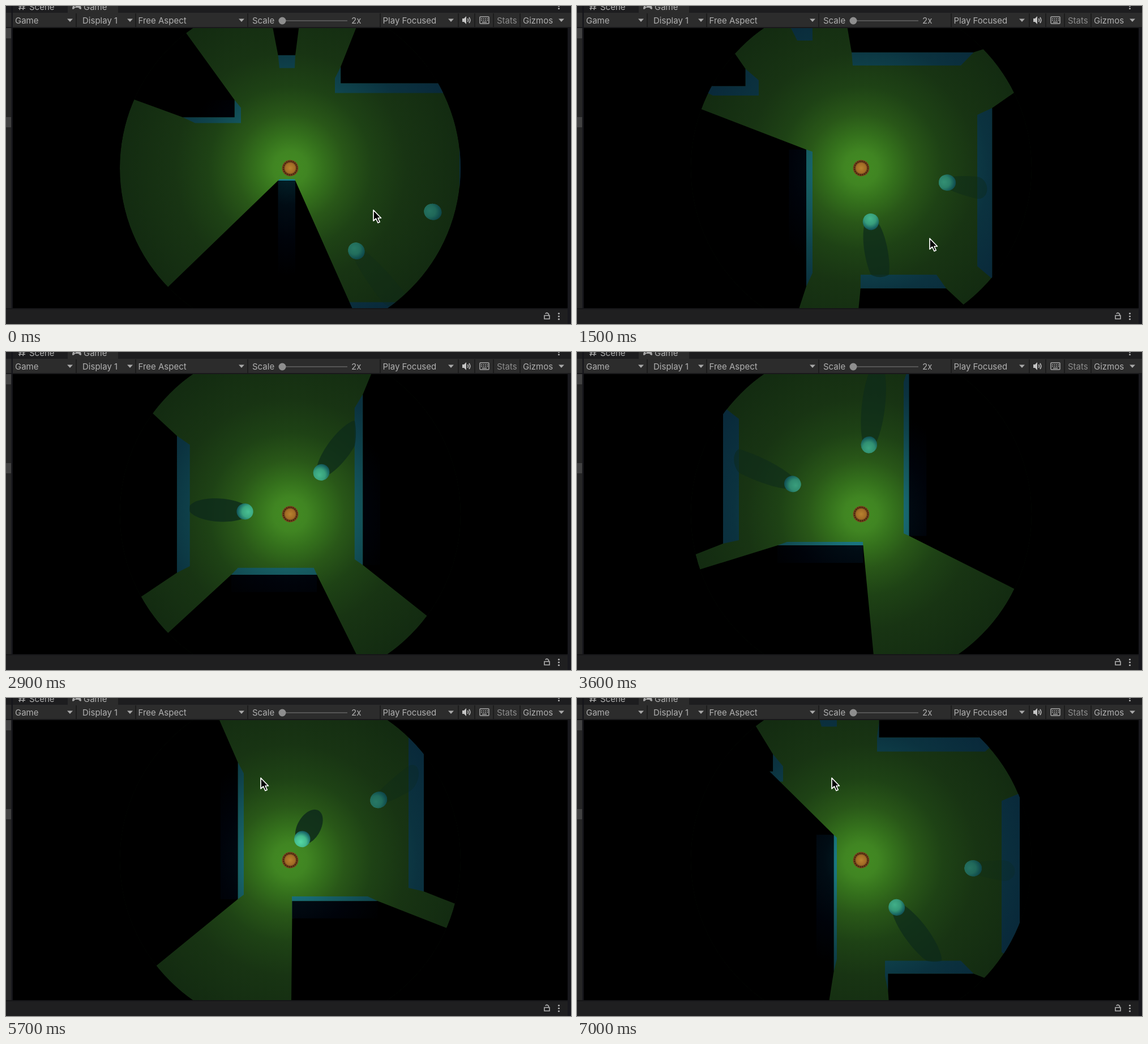
An HTML page that plays this animation: 998 by 561 pixels, repeating every 7100 ms.

```html
<!DOCTYPE html>
<html lang="en">
<head>
<meta charset="utf-8">
<title>Field of view</title>
<style>
html, body { margin: 0; width: 100%; height: 100%; overflow: hidden; background: #000; }
svg { display: block; width: 100vw; height: 100vh; }
text { font: 15px Inter, Roboto, sans-serif; fill: #b0b0b0; }
</style>
</head>
<body>
<svg viewBox="0 0 998 561">
  <defs>
    <clipPath id="view"><rect x="12" y="39" width="980" height="494"/></clipPath>
    <clipPath id="sight"><circle r="301"/></clipPath>
    <radialGradient id="floor" gradientUnits="userSpaceOnUse" cx="0" cy="0" r="301">
      <stop offset="0" stop-color="#438c23"/>
      <stop offset=".1" stop-color="#408522"/>
      <stop offset=".2" stop-color="#34701c"/>
      <stop offset=".32" stop-color="#295718"/>
      <stop offset=".48" stop-color="#1e4215"/>
      <stop offset=".68" stop-color="#183413"/>
      <stop offset="1" stop-color="#132b11"/>
    </radialGradient>
    <radialGradient id="face" gradientUnits="userSpaceOnUse" cx="0" cy="0" r="301">
      <stop offset=".08" stop-color="#1b8290"/>
      <stop offset=".33" stop-color="#165c62"/>
      <stop offset=".55" stop-color="#0f434c"/>
      <stop offset=".75" stop-color="#0b323f"/>
      <stop offset="1" stop-color="#09293a"/>
    </radialGradient>
    <radialGradient id="top" gradientUnits="userSpaceOnUse" cx="0" cy="0" r="190">
      <stop offset=".1" stop-color="#032028"/>
      <stop offset=".35" stop-color="#010c14"/>
      <stop offset=".65" stop-color="#00030a"/>
      <stop offset="1" stop-color="#000"/>
    </radialGradient>
    <radialGradient id="ball" cx=".3" cy=".5" r=".72">
      <stop offset="0" stop-color="#55d8a2"/>
      <stop offset=".5" stop-color="#44ba8d"/>
      <stop offset=".8" stop-color="#217a70"/>
      <stop offset="1" stop-color="#114f59"/>
    </radialGradient>
    <radialGradient id="hero">
      <stop offset="0" stop-color="#b8822f"/>
      <stop offset=".6" stop-color="#a16a25"/>
      <stop offset=".75" stop-color="#6c4018"/>
      <stop offset="1" stop-color="#754a1e"/>
    </radialGradient>
  </defs>

  <g clip-path="url(#view)">
    <g transform="translate(502 286)">
      <g clip-path="url(#sight)">
        <circle r="301" fill="url(#floor)"/>
        <path id="faces" fill="url(#face)"/>
        <g id="shadows" fill="#0d2a1b"/>
        <g id="balls"/>
        <path id="hidden" fill="#000"/>
        <path id="tops" fill="url(#top)"/>
      </g>
      <circle r="14.5" fill="url(#hero)"/>
      <circle r="12" fill="none" stroke="#4a2410" stroke-width="2.4" stroke-dasharray="2.4 1.37"/>
    </g>
  </g>

  <rect width="998" height="12" fill="#1d1d1f"/>
  <rect x="109" width="89" height="13" fill="#2c2c2c"/>
  <rect y="12" width="998" height="26" fill="#2c2c2c"/>
  <rect y="37" width="998" height="2" fill="#19191b"/>
  <rect y="533" width="998" height="28" fill="#1f1f20"/>
  <rect y="533" width="998" height="2" fill="#161618"/>
  <rect y="39" width="10" height="494" fill="#262626"/>
  <path d="M0 39H9V57H0ZM0 196H9V214H0Z" fill="#424242"/>
  <rect x="9.5" width="2.5" height="533" fill="#15151a"/>
  <rect x="992" y="39" width="6" height="522" fill="#18181d"/>
  <path id="bars" stroke="#1b1b1b" stroke-width="1.6"/>
  <g id="labels"></g>
  <path id="carets" fill="#a8a8a8"/>
  <path d="M488 26H603" stroke="#555" stroke-width="2"/>
  <circle cx="488" cy="26" r="6.5" fill="#8e8e8e"/>

  <!-- toolbar and tab icons -->
  <path d="M806 22H809L813 18V32L809 28H806Z" fill="#c4c4c4"/>
  <path d="M815.500 22Q817.500 25 815.500 28M818 20Q821.500 25 818 30" fill="none" stroke="#c4c4c4" stroke-width="1.500"/>
  <rect x="837" y="19" width="16" height="12" rx="1" fill="none" stroke="#a8a8a8" stroke-width="1.500"/>
  <path d="M839 22.500H852M839 25.500H852" stroke="#a8a8a8" stroke-width="1.600" stroke-dasharray="2 1.500"/>
  <path d="M841 28.500H849" stroke="#a8a8a8" stroke-width="1.500"/>
  <path d="M26 -3L24 7M32 -3L30 7M22 0H34M22 4H34" stroke="#a8a8a8" stroke-width="1.600"/>
  <path d="M120 -3H130Q133 1 133 5Q131 7 128 3H122Q119 7 117 5Q117 1 120 -3Z" fill="#a8a8a8"/>
  <path d="M122 -2V2M120 0H124" stroke="#2c2c2c"/>
  <path d="M951 546H960V552H951ZM958.500 546V543.500Q955.500 539.500 952.800 543" fill="none" stroke="#b0b0b0" stroke-width="1.600"/>
  <g fill="#b0b0b0">
    <circle cx="976.500" cy="542.500" r="1.600"/><circle cx="976.500" cy="547.500" r="1.600"/>
    <circle cx="976.500" cy="552.500" r="1.600"/><circle cx="976.500" cy="0" r="1.500"/>
    <circle cx="976.500" cy="4.500" r="1.500"/>
  </g>
  <path id="pointer" d="M0 0V19L4.500 15 8 22.500 11.200 21 8 14H13.500Z" fill="#000" stroke="#fff" stroke-width="1.700" stroke-linejoin="round"/>
</svg>
<script>
const $ = id => document.getElementById(id);
const LOOP = 7100, STEP = 100;
const SIGHT = 301;
const LIFT = 1.13;         // perspective scale at wall-top height
const MID = 1.063;         // the same at ball-centre height
const EYE = 233;           // camera height above the floor
const LAMP = 47, RAD = 13.4;
const SPREAD = 1.6 * Math.PI / 180;

// walls on the floor: left, top, right, bottom
const walls = [
  [-159, -76, -132, 138],
  [159, -141, 186, 126],
  [-47, 141, 87, 168],
  [-61, -254, 130, -228],
  [-308, -202, -227, -175],
  [-159, -420, -132, -272]
];
const room = [-132, -228, 159, 141];
const balls = [[97, -23], [-30, 42]];

// time, x, y
const walk = [
  [0, -140, -95.5], [250, -140, -95.5], [800, -93, -95], [1500, -46, -47],
  [2200, 0, 0], [3500, 84, 86], [3600, 84, 92], [3980, 60, 116],
  [4600, 18, 116], [4960, -11, 116], [5650, -50, 77], [5750, -50, 77],
  [6300, -89, 34], [7000, -89, -36.5]
];
const mouse = [
  [0, 649, 360], [200, 649, 360], [900, 623, 410], [2900, 623, 410],
  [4100, 450, 141], [7100, 450, 141]
];

function along(keys, t) {
  let i = 0;
  while (i < keys.length - 2 && keys[i + 1][0] < t) i++;
  const [a, ax, ay] = keys[i], [b, bx, by] = keys[i + 1];
  const k = Math.min(1, (t - a) / (b - a));
  return [ax + (bx - ax) * k, ay + (by - ay) * k];
}

const set = (el, attrs) => {
  for (const k in attrs) el.setAttribute(k, attrs[k]);
  return el;
};
const add = (parent, tag, attrs = {}) =>
  parent.appendChild(set(document.createElementNS("http://www.w3.org/2000/svg", tag), attrs));
const clamp = (v, lo, hi) => Math.min(hi, Math.max(lo, v));
const poly = pts => "M" + pts.map(p => p[0].toFixed(2) + " " + p[1].toFixed(2)).join("L") + "Z";
const polar = (r, a) => [r * Math.cos(a), r * Math.sin(a)];
const raise = p => [p[0] * LIFT, p[1] * LIFT];
const shift = ([l, t, r, b], x, y) => [l - x, t - y, r - x, b - y];

function facesOf([l, t, r, b]) {
  const quad = (p, q) => poly([p, q, raise(q), raise(p)]);
  let d = "";
  if (l > 0) d += quad([l, t], [l, b]);
  if (r < 0) d += quad([r, t], [r, b]);
  if (t > 0) d += quad([l, t], [r, t]);
  if (b < 0) d += quad([l, b], [r, b]);
  return d;
}

const corners = ([l, t, r, b]) => [[l, t], [r, t], [r, b], [l, b]].map(raise);

// area a wall hides, opening slightly past its outermost corners
function blindOf(wall) {
  const pts = corners(wall);
  const mid = Math.atan2(wall[1] + wall[3], wall[0] + wall[2]);
  const turn = p => {
    const a = Math.atan2(p[1], p[0]) - mid;
    return Math.atan2(Math.sin(a), Math.cos(a));
  };
  pts.sort((p, q) => turn(p) - turn(q));
  const lo = pts[0], hi = pts[3];
  const a = mid + turn(lo) - SPREAD, b = mid + turn(hi) + SPREAD;
  const reach = p => Math.max(SIGHT, Math.hypot(...p) + 5);
  return poly([lo, polar(reach(lo), a), polar(900, a), polar(1400, mid),
    polar(900, b), polar(reach(hi), b), hi]);
}

// a shadow point that passes a room side climbs that wall
function land([x, y], [l, t, r, b]) {
  let s = 1;
  if (l < 0 && x < l) s = Math.min(s, l / x);
  if (r > 0 && x > r) s = Math.min(s, r / x);
  if (t < 0 && y < t) s = Math.min(s, t / y);
  if (b > 0 && y > b) s = Math.min(s, b / y);
  const k = s / (1 - LAMP * (1 - s) / EYE);
  return [x * k, y * k];
}

// outline of the lamp's cone around a ball at distance d
function shadowOf(d, angle, box) {
  const drop = Math.atan2(LAMP - RAD, d);
  const half = Math.asin(RAD / Math.hypot(d, LAMP - RAD));
  const near = LAMP / Math.tan(drop + half), far = LAMP / Math.tan(drop - half);
  const c = (near + far) / 2;
  const dot = (c * Math.cos(drop) + LAMP * Math.sin(drop)) / Math.cos(half);
  const w = Math.sqrt(Math.max(0, dot * dot - c * c - LAMP * LAMP));
  const [ux, uy] = polar(1, angle);
  const pts = [];
  for (let i = 0; i < 72; i++) {
    const [ex, ey] = polar(1, i * Math.PI / 36);
    const x = c + ex * (far - near) / 2, y = ey * w;
    pts.push(land([x * ux - y * uy, x * uy + y * ux], box));
  }
  return poly(pts);
}

const ballParts = balls.map(() => {
  const g = add($("balls"), "g");
  return {
    shadow: add($("shadows"), "path"),
    g,
    lit: add(g, "ellipse", { fill: "url(#ball)", ry: 14.2 }),
    dim: add(g, "ellipse", { fill: "#0b3a3c", ry: 14.2 })
  };
});

function drawBall(part, x, y, box) {
  const d = Math.hypot(x, y), angle = Math.atan2(y, x);
  set(part.shadow, {
    d: shadowOf(d, angle, box),
    "fill-opacity": clamp(1.15 - d / 210, 0, .85)
  });
  set(part.g, { transform: `rotate(${angle * 180 / Math.PI}) translate(${d * MID})` });
  const rx = 14.2 * (1 + d / 2500);
  set(part.lit, { rx });
  set(part.dim, { rx, opacity: clamp((d - 40) / 230, 0, .64) });
}

function draw(t) {
  const [cx, cy] = along(walk, t);
  const near = walls.map(w => shift(w, cx, cy));
  $("faces").setAttribute("d", near.map(facesOf).join(""));
  $("hidden").setAttribute("d", near.map(blindOf).join(""));
  $("tops").setAttribute("d", near.map(w => poly(corners(w))).join(""));

  const box = shift(room, cx, cy);
  balls.forEach(([x, y], i) => drawBall(ballParts[i], x - cx, y - cy, box));

  const [mx, my] = along(mouse, t);
  set($("pointer"), {
    transform: `translate(${mx} ${my})`,
    visibility: t >= 2900 && t < 4100 ? "hidden" : "visible"
  });
}

[["Scene", 41, 7], ["Game", 137, 7], ["Game", 16, 30.5], ["Display 1", 135, 30.5],
 ["Free Aspect", 233.5, 30.5], ["Scale", 435, 31], ["2x", 610, 31],
 ["Play Focused", 665.5, 30.5], ["Stats", 867, 30.5], ["Gizmos", 913, 30.5]
].forEach(([s, x, y]) => {
  const el = add($("labels"), "text", { x, y });
  el.textContent = s;
  if (s === "Stats") el.style.fill = "#8c8c8c";
});
$("bars").setAttribute("d", [124, 229, 427, 661, 799, 828, 861, 908].map(x => `M${x} 13V37`).join(""));
$("carets").setAttribute("d", [113, 219, 416, 786, 981].map(x => `M${x - 5} 22.5h10l-5 5.500Z`).join(""));

function tick() {
  const t = performance.now() % LOOP;
  draw(Math.floor(t / STEP) * STEP);
  requestAnimationFrame(tick);
}
tick();
</script>
</body>
</html>
```
